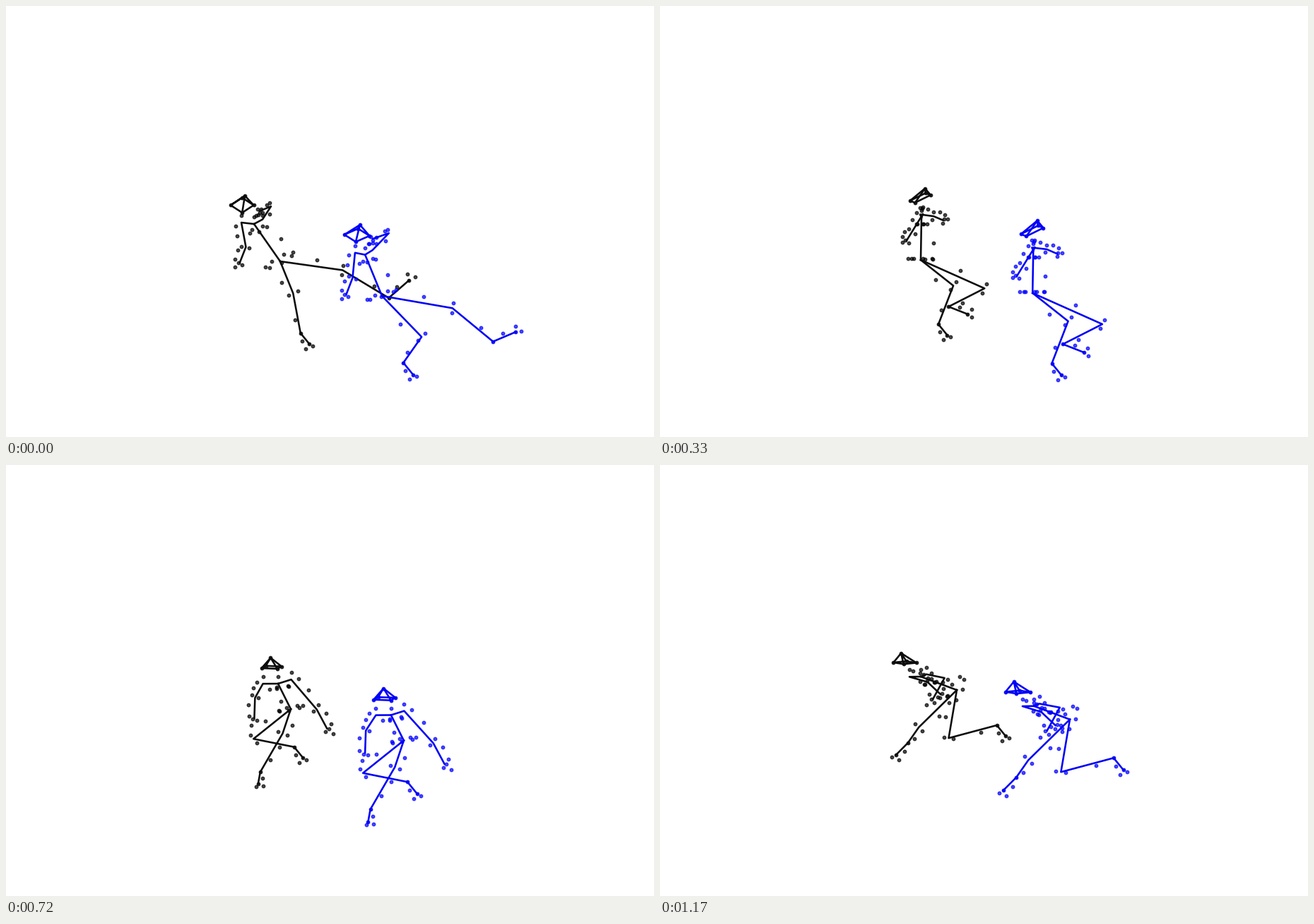
A matplotlib script that plays this animation: 917x611 px, repeating every 1200 ms.

```python
import numpy as np
import matplotlib.pyplot as plt
from matplotlib.animation import FuncAnimation

W, H, DPI = 917, 611, 100
FRAMES, STEP = 40, 30
KEYS = np.array([0, 120, 330, 540, 720, 990, 1170])
TIMES = np.arange(FRAMES) * STEP


def ease(t, values):
    """Cubic Hermite curve through the key values."""
    v = np.array(values, float)
    slope = np.gradient(v, KEYS, axis=0)
    i = np.clip(np.searchsorted(KEYS, t, "right") - 1, 0, len(KEYS) - 2)
    h = (KEYS[i + 1] - KEYS[i])[:, None]
    s = np.clip((t - KEYS[i])[:, None] / h, 0, 1)
    return ((2 * s**3 - 3 * s**2 + 1) * v[i] + (s**3 - 2 * s**2 + s) * h * slope[i]
            + (3 * s**2 - 2 * s**3) * v[i + 1] + (s**3 - s**2) * h * slope[i + 1])


def vec(x, y):
    return np.column_stack(np.broadcast_arrays(x, y))


# Both runners share one motion: legs hang from the pelvis, arms from the chest.
PELVIS = [(388, 362), (374, 369), (369, 360), (379, 360), (403, 346), (434, 339), (420, 319)]
LEAN = [(-37, -53), (-14, -62), (1, -60), (4, -49), (-18, -36), (-54, -15), (-51, -19)]
SPREAD = [[15], [10], [-2], [22], [20], [-3], [-12]]
LEGS = {
    "m": ([(19, 47), (76, 60), (48, 38), (-45, 30), (-55, 44), (-45, 58), (-12, 71)],
          [(30, 106), (28, 80), (26, 95), (6, 65), (5, 56), (22, 44), (59, 52)]),
    "n": ([(92, 13), (97, 20), (94, 42), (57, 30), (-12, 36), (-56, 42), (-56, 55)],
          [(160, 54), (138, 67), (41, 69), (40, 84), (-45, 93), (-91, 65), (-72, 78)]),
}
ARMS = {
    "a": ([(-12, 34), (-20, 29), (-14, 21), (-66, 25), (-34, 21), (-25, 35), (35, 2)],
          [(-21, 57), (-28, 50), (-22, 34), (-48, 43), (-35, 51), (-55, 40), (18, 33)]),
    "b": ([(25, -26), (36, -30), (18, -2), (37, 4), (57, 38), (9, 14), (10, 8)],
          [(8, -19), (13, -22), (32, 4), (60, 9), (72, 66), (17, 31), (29, 26)]),
}
SIDE = {"a": 1, "b": -1, "m": 1, "n": -1}

CHAINS = [["pelvis", "spine", "chest"], ["q0", "q1", "q2", "q3", "q0", "top", "q2"],
          ["q1", "top", "q3"]]
CHAINS += [["chest", *(limb + k for k in "123")] for limb in ARMS]
CHAINS += [["pelvis", *(limb + k for k in "123")] for limb in LEGS]
SOLID = ["top", "q0", "q1", "q2", "q3", "m2", "m3", "n2", "n3"]


def facing_at(t):
    """+1 faces right, -1 faces left."""
    return -np.tanh((t - 640) / 200)


def add_head(body, t, lean, size):
    center = body["chest"] + vec(0.4 * lean[:, 0] - 2, 0.2 * lean[:, 1] - 16)
    yaw = t / 690
    depth = 2 + 9 * np.exp(-t / 250)
    tilt = -7 * np.exp(-((t - 330) / 110) ** 2)
    for k in range(4):
        turn = yaw + np.pi * (1 - k / 2)
        x, y = 17 * np.cos(turn), depth * np.sin(turn) + tilt * np.cos(turn)
        body[f"q{k}"] = center + size * vec(x, y)
    body["top"] = center + size * vec(4 - t / 110 + 6 * np.sin(t / 200) ** 2, -14)


def pose(t, pelvis, size):
    facing = facing_at(t)
    lean = ease(t, LEAN)
    chest = pelvis + lean
    across = ease(t, SPREAD) * [1, -0.15]
    body = dict(pelvis=pelvis, chest=chest, spine=(pelvis + chest) / 2)
    for limb, (elbow, wrist) in ARMS.items():
        body[limb + "1"] = chest + 0.08 * lean - SIDE[limb] * across
        body[limb + "2"] = chest + size * ease(t, elbow)
        body[limb + "3"] = chest + size * ease(t, wrist)
    feet = {"m": vec(13 + 0 * t, 16), "n": vec(6 + 24 * facing, 18 - 44 * np.exp(-t / 180))}
    for limb, (knee, ankle) in LEGS.items():
        body[limb + "1"] = pelvis + size * ease(t, knee)
        body[limb + "2"] = pelvis + size * ease(t, ankle)
        body[limb + "3"] = body[limb + "2"] + size * feet[limb]
    add_head(body, t, lean, size)
    return body, place_markers(body, across / 21, facing[:, None])


def along(start, end, part, off):
    """Point part of the way along a bone, pushed off it sideways."""
    bone = end - start
    normal = vec(-bone[:, 1], bone[:, 0])
    normal = normal / np.maximum(np.hypot(*bone.T), 6)[:, None]
    return start + part * bone + off * normal


def place_markers(body, across, facing):
    pelvis, chest = body["pelvis"], body["chest"]
    spots = [body[j] + [0, -10] for j in ("a1", "b1", "chest")]
    spots.append(along(pelvis, chest, 0.4, 19 * facing))

    # rings of markers around the hips and the chest
    for level, count, wide, deep in ((0.03, 7, 17, 20), (0.85, 5, 15, 9)):
        for turn in 0.4 + np.arange(count) * 2 * np.pi / count:
            ring = along(pelvis, chest, level, deep * np.sin(turn) * facing)
            spots.append(ring + wide * np.cos(turn) * across)

    for limb, side in SIDE.items():
        joints = [body[limb + k] for k in "123"]
        if limb in ARMS:
            rules = [(0, 0.1, 9), (0, 0.5, 9), (0, 0.95, 6), (1, 0, -5), (1, 0.35, 9),
                     (1, 0.9, 8), (1, 1.05, 2), (1, 1.1, -4), (1, 1.35, 4)]
        else:
            joints.insert(0, pelvis)
            rules = [(0, 0.58, 9), (0, 1, 7), (0, 1, -7), (1, 0.65, 4),
                     (2, 0.5, 5), (2, 1.1, 8), (2, 1.25, -2)]
        for bone, part, off in rules:
            spots.append(along(joints[bone], joints[bone + 1], part, side * off))
    return np.array(spots)


fig = plt.figure(figsize=(W / DPI, H / DPI), dpi=DPI, facecolor="white")
ax = fig.add_axes([0, 0, 1, 1])
ax.set(xlim=(0, W), ylim=(H, 0))
ax.axis("off")


class Runner:
    def __init__(self, t, pelvis, size, color, shade):
        self.body, self.spots = pose(t, pelvis, size)
        self.dots, = ax.plot([], [], "o", color=color, ms=3.3, mew=0.9, alpha=0.72)
        self.lines = [ax.plot([], [], color=shade, lw=1.85)[0] for _ in CHAINS]
        self.solid, = ax.plot([], [], "o", color=shade, ms=3.4, mew=0.7, alpha=0.9)

    def draw(self, i):
        for line, chain in zip(self.lines, CHAINS):
            line.set_data(*np.array([self.body[j][i] for j in chain]).T)
        self.dots.set_data(*self.spots[:, i].T)
        self.solid.set_data(*np.array([self.body[j][i] for j in SOLID]).T)
        return [self.dots, *self.lines, self.solid]


path = ease(TIMES, PELVIS)
gap = vec(160 - 16 * np.exp(-TIMES / 150), 49 - TIMES / 160)
ahead = TIMES + 65 * np.exp(-TIMES / 60)
runners = [Runner(TIMES, path, 0.96, "black", "#0c0c0c"),
           Runner(ahead, path + gap, 1.05, "blue", "#0000f6")]


def update(i):
    return [artist for runner in runners for artist in runner.draw(i)]


anim = FuncAnimation(fig, update, frames=FRAMES, interval=STEP, repeat=True, repeat_delay=0)
plt.show()
```
